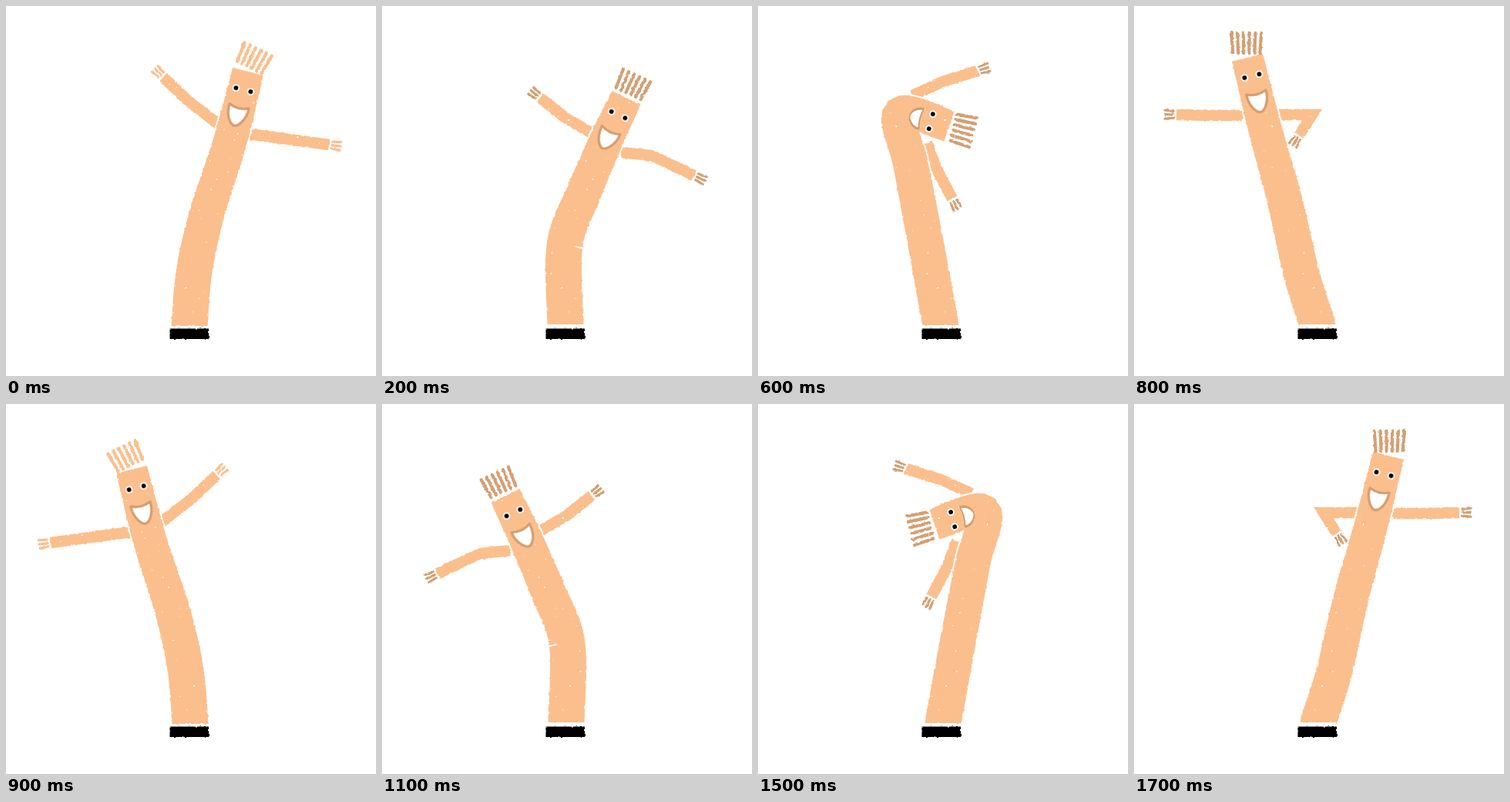
An HTML page that plays this animation: 480 px wide and 480 px high, repeating every 1800 ms.

```html
<!DOCTYPE html>
<html lang="en">
<head>
<meta charset="utf-8">
<title>Tube dancer</title>
<style>
html, body { margin: 0; width: 100%; height: 100%; overflow: hidden; background: #fff; }
svg { display: block; width: 100vw; height: 100vh; }
.body { fill: #fbbf8d; stroke: #fff; stroke-width: 4; paint-order: stroke; }
.arm { fill: none; stroke: #fbbf8d; stroke-width: 14.5; }
.line { fill: none; stroke-linecap: round; }
.crease { stroke: #fff; stroke-width: 2; }
.mouth { fill: #fff; stroke: #d39d70; stroke-width: 3.2; stroke-linejoin: round; }
</style>
</head>
<body>
<svg viewBox="0 0 480 480">
  <defs>
    <filter id="crayon" filterUnits="userSpaceOnUse" x="0" y="0" width="480" height="480" color-interpolation-filters="sRGB">
      <feTurbulence type="fractalNoise" baseFrequency=".22" numOctaves="2" seed="3" result="noise"/>
      <feDisplacementMap in="SourceGraphic" in2="noise" scale="3" xChannelSelector="R" yChannelSelector="G" result="rough"/>
      <feColorMatrix in="noise" values="0 0 0 0 0  0 0 0 0 0  0 0 0 0 0  0 0 16 0 -12.6" result="specks"/>
      <feComposite in="rough" in2="specks" operator="out"/>
    </filter>
  </defs>
  <g id="dancer"></g>
  <path d="M212.5 418.5H263V432H212.5Z" filter="url(#crayon)"/>
</svg>
<script>
const STEP = 100, LIGHT = '#fbbf8d', DARK = '#d2a074';
const points = text => text.split(' ').map(p => p.split(',').map(Number));
const key = (spine, arms, sway = 0, tint = DARK) =>
  ({ spine: points(spine), arms: arms.map(points), sway, tint });

// Key poses: spine from base to crown, arms from shoulder to wrist, hair sway in degrees.
const keys = [
  key('238,415 244,345 260,272 290,178 314,85', ['274,152 236,123 204,92', '314,166 368,173 419,180'], 12, LIGHT),
  key('238,413 237,310 262,242 291,174 317,119', ['274,166 238,145 205,119', '311,190 350,194 405,220'], 0),
  key('237,414 226,320 216,236 262,204 324,181', ['253,180 246,139 215,148', '274,220 322,238 370,255'], 0),
  key('237,414 218,310 198,205 184,139 248,156', ['200,116 240,98 285,84', '219,178 232,212 252,250'], 0),
  key('238,413 218,350 195,250 171,163 147,67', ['141,142 97,142 55,141', '188,141 231,141 214,168'], 14)
];

const mix = (a, b, k) => a + (b - a) * k;
const mid = (a, b) => [mix(a[0], b[0], .5), mix(a[1], b[1], .5)];
const length = (a, b) => Math.hypot(b[0] - a[0], b[1] - a[1]);
const heading = (a, b) => Math.atan2(b[0] - a[0], a[1] - b[1]);   // 0 is up, clockwise
const turn = (from, to) => Math.atan2(Math.sin(to - from), Math.cos(to - from));
const degrees = a => a * 180 / Math.PI;

// Halfway between two chains: every link keeps its length and swings by half the turn.
function halfway(a, b) {
  const out = [mid(a[0], b[0])];
  for (let i = 1; i < a.length; i++) {
    const from = heading(a[i - 1], a[i]), to = heading(b[i - 1], b[i]);
    const angle = from + turn(from, to) / 2;
    const reach = (length(a[i - 1], a[i]) + length(b[i - 1], b[i])) / 2;
    const [x, y] = out[i - 1];
    out.push([x + reach * Math.sin(angle), y - reach * Math.cos(angle)]);
  }
  return out;
}

const between = (a, b) => ({
  spine: halfway(a.spine, b.spine),
  arms: a.arms.map((arm, i) => halfway(arm, b.arms[i])),
  sway: mix(a.sway, b.sway, .5),
  tint: DARK
});

function smooth(chain, steps = 10) {
  const at = i => chain[Math.max(0, Math.min(chain.length - 1, i))];
  const out = [];
  for (let i = 0; i < chain.length - 1; i++) {
    for (let s = 0; s < steps; s++) {
      const t = s / steps;
      out.push([0, 1].map(c => {
        const [p, q, r, u] = [-1, 0, 1, 2].map(k => at(i + k)[c]);
        return q + t / 2 * (r - p + t * (2 * p - 5 * q + 4 * r - u + t * (3 * (q - r) + u - p)));
      }));
    }
  }
  return [...out, at(chain.length)];
}

// A tube that narrows toward the head, cut level at the base.
function tube(spine) {
  const line = smooth(spine), last = line.length - 1, left = [], right = [];
  line.forEach(([x, y], i) => {
    const angle = i ? heading(line[i - 1], line[Math.min(i + 1, last)]) : 0;
    const w = mix(47, 41, (i / last) ** 2) / 2;
    const dx = w * Math.cos(angle), dy = w * Math.sin(angle);
    left.push([x - dx, y - dy]);
    right.unshift([x + dx, y + dy]);
  });
  return `<polygon class="body" points="${[...left, ...right].join(' ')}"/>`;
}

// White fold line on the inner side of a sharp bend below the neck.
function creases(spine) {
  return [1, 2].map(i => {
    const a = heading(spine[i - 1], spine[i]), bend = turn(a, heading(spine[i], spine[i + 1]));
    if (Math.abs(bend) < .33) return '';
    const side = Math.sign(bend), inner = 24 - 26 * Math.abs(bend);
    return `<path class="line crease" d="M${side * 24} 0H${side * inner}" ${place(spine[i], a + bend / 2)}/>`;
  }).join('');
}

const place = ([x, y], angle) => `transform="translate(${x} ${y}) rotate(${degrees(angle)})"`;

// Strands pointing up from the local origin.
function fan(count, root, tip, start, end, width) {
  let d = '';
  for (let i = 0; i < count; i++) {
    const k = 2 * i / (count - 1) - 1;
    d += `M${k * root} ${-start}L${k * tip} ${-end}`;
  }
  return `<path class="line" d="${d}" stroke-width="${width}"/>`;
}

function armAndHand(arm) {
  const [, elbow, wrist] = arm;
  return `<polyline class="arm" points="${arm.join(' ')}"/>
    <g ${place(wrist, heading(elbow, wrist))}>${fan(3, 4.4, 5.4, 4, 15, 3.2)}</g>`;
}

const eye = x => `<circle cx="${x}" r="4.8" fill="#fff"/><circle cx="${x}" r="2.9"/>`;
const smile = 'M-13 22Q0 28 13 22Q14 33 8 42Q1 53 -6 45Q-13 37 -13 22Z';

function figure({ spine, arms, sway, tint }) {
  const [chest, neck, crown] = spine.slice(-3);
  const tilt = heading(neck, crown);
  const squash = 1 - Math.abs(turn(heading(chest, neck), tilt)) * .2;
  return `<g filter="url(#crayon)" stroke="${tint}">
      ${arms.map(armAndHand).join('')}
      ${tube(spine)}
      ${creases(spine)}
      <g ${place(crown, tilt)}>
        <g transform="translate(0 -5) rotate(${sway})">${fan(6, 17.5, 19.5, 1, 27, 4.2)}</g>
      </g>
    </g>
    <g ${place(crown, tilt)}>
      <g transform="translate(0 24.5)">
        <path class="mouth" d="${smile}" transform="scale(1 ${squash})"/>
        ${eye(-9.8)}${eye(9.8)}
      </g>
    </g>`;
}

const figures = [];
keys.forEach((pose, i) => {
  if (i) figures.push(figure(between(keys[i - 1], pose)));
  figures.push(figure(pose));
});

const dancer = document.getElementById('dancer');
const half = figures.length;
let shown = -1;

// The second half of the loop is the first half mirrored.
function tick() {
  const n = Math.floor(performance.now() / STEP) % (half * 2);
  if (n !== shown) {
    shown = n;
    dancer.setAttribute('transform', n < half ? '' : 'translate(477 0) scale(-1 1)');
    dancer.innerHTML = figures[n % half];
  }
  requestAnimationFrame(tick);
}
tick();
</script>
</body>
</html>
```
